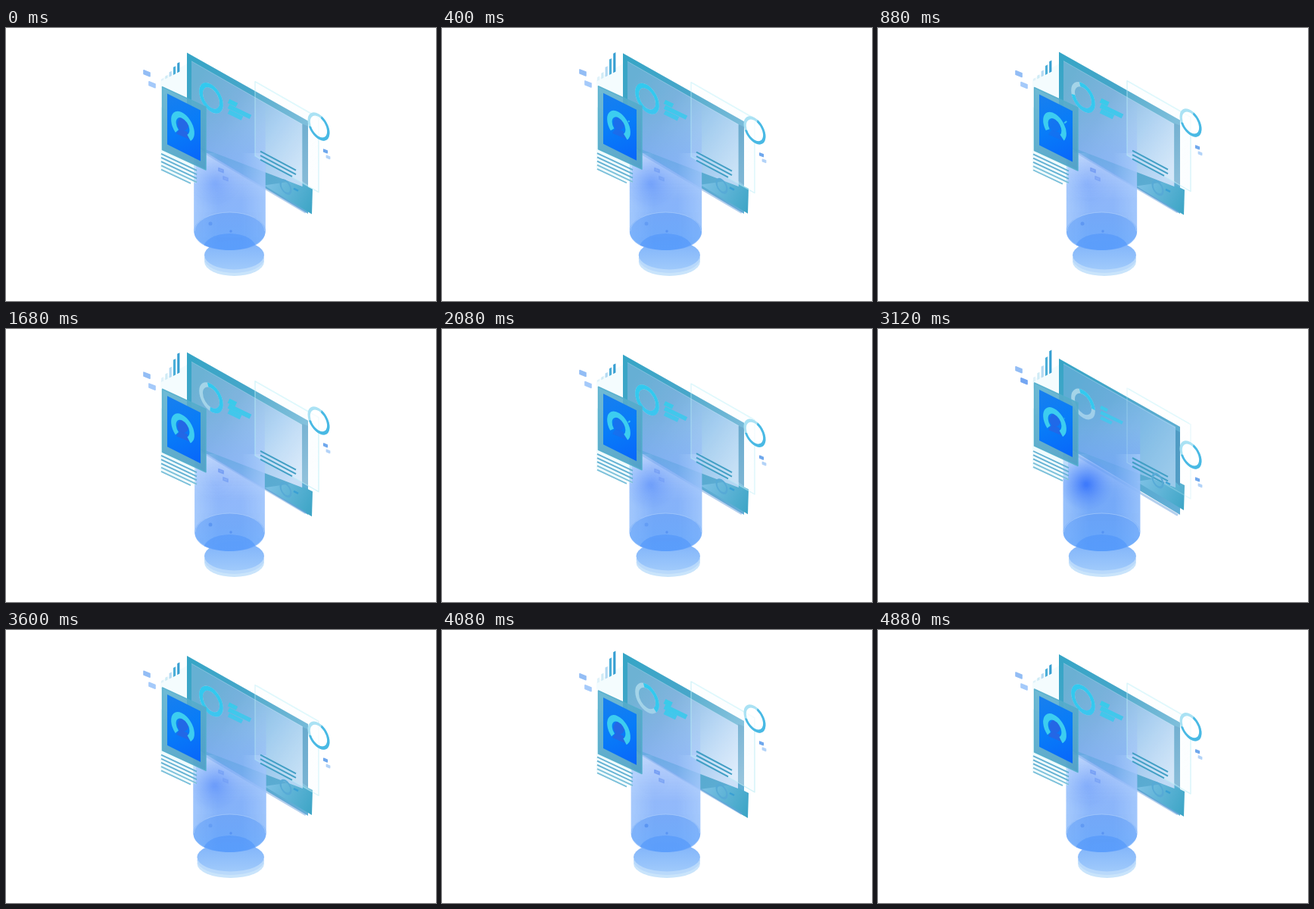
Animation of 568x360 px, one loop 4.96 s. Source, as an HTML page with a canvas:

```html
<!DOCTYPE html>
<html lang="en">
<head>
<meta charset="utf-8">
<title>Floating screens</title>
<style>
html, body { margin: 0; width: 100%; height: 100%; overflow: hidden; background: #fff; }
canvas { display: block; width: 568px; height: 360px; }
</style>
</head>
<body>
<canvas id="stage" width="568" height="360"></canvas>
<script>
const ctx = document.getElementById('stage').getContext('2d');
const LOOP = 4960, CHART = LOOP / 2, STEP = 80, TAU = Math.PI * 2;

// [time, value] keys: a small rise, then the main one
const FLOAT = [[0, 0.265], [320, 0.38], [880, 0.163], [1340, 0.03], [1680, 0.08],
  [2480, 0.775], [2860, 1.03], [3120, 1], [4080, 0], [4880, 0.22]];
const BARS = [[0, 0.42], [540, 1], [650, 1], [880, 0.5], [1180, 0.5], [1500, 1],
  [1600, 1], [2000, 0.4]];
const FACE = [[0, 1], [880, 0.35], [1680, 1], [2480, 0], [3120, 0.9], [4080, 1]];
const BASE_LEFT = [[0, 262], [880, 257], [1680, 262], [2480, 251], [4080, 253], [4880, 264]];

const clamp = v => Math.min(1, Math.max(0, v));

// Periodic curve through the keys, smooth or straight
function track(keys, t, period = LOOP, smooth = false) {
  const n = keys.length;
  const key = i => {
    const [time, value] = keys[(i + n) % n];
    return [time + period * Math.floor(i / n), value];
  };
  let i = n - 1;
  while (keys[i][0] > t) i--;
  const [t0, a] = key(i), [t1, b] = key(i + 1);
  const u = (t - t0) / (t1 - t0);
  if (!smooth) return a + (b - a) * u;
  const slope = j => {
    const [p, v] = key(j - 1), [q, w] = key(j + 1);
    return (w - v) / (q - p) * (t1 - t0);
  };
  const u2 = u * u, u3 = u2 * u;
  return a * (2 * u3 - 3 * u2 + 1) + slope(i) * (u3 - 2 * u2 + u)
       + b * (3 * u2 - 2 * u3) + slope(i + 1) * (u3 - u2);
}

// The donut refills twice per chart cycle
function donutFill(t) {
  const c = t % CHART;
  if (c < 490) return 1;
  return clamp((c - (c < 1390 ? 490 : 1390)) / 510);
}

function gradient(x0, y0, x1, y1, ...colors) {
  const g = ctx.createLinearGradient(x0, y0, x1, y1);
  colors.forEach((c, i) => g.addColorStop(i / (colors.length - 1), c));
  return g;
}

function poly(points, fill, stroke, width = 1) {
  ctx.beginPath();
  points.forEach(([x, y]) => ctx.lineTo(x, y));
  ctx.closePath();
  ctx.lineJoin = 'round';
  if (fill) { ctx.fillStyle = fill; ctx.fill(); }
  if (stroke) { ctx.strokeStyle = stroke; ctx.lineWidth = width; ctx.stroke(); }
}

const slant = (x, y, w, h, k = 0.56) =>
  [[x, y], [x + w, y + w * k], [x + w, y + w * k + h], [x, y + h]];

function line(x, y, w, k, color, width) {
  ctx.strokeStyle = color;
  ctx.lineWidth = width;
  ctx.beginPath();
  ctx.moveTo(x, y);
  ctx.lineTo(x + w, y + w * k);
  ctx.stroke();
}

function isoArc(x, y, r, width, color, from = 0, to = TAU) {
  ctx.save();
  ctx.transform(0.866, 0.5, 0, 1, x, y);
  ctx.beginPath();
  ctx.arc(0, 0, r, from, to);
  ctx.strokeStyle = color;
  ctx.lineWidth = width;
  ctx.stroke();
  ctx.restore();
}

function ellipse(x, y, rx, ry, fill) {
  ctx.beginPath();
  ctx.ellipse(x, y, rx, ry, 0, 0, TAU);
  ctx.fillStyle = fill;
  ctx.fill();
}

function tile(x, y, s, color) {
  poly(slant(x - s, y - s * 0.8, s * 2, s * 1.2, 0.4), color, color, 1.6);
}

function drawBars(t) {
  const g = track(BARS, t % CHART, CHART);
  const colors = ['#e0f2fa', '#cfebf6', '#b2d9f2', '#4baed8', '#379fd2'];
  poly([[204, 68], [239, 47], [239, 92], [204, 78]], 'rgba(205,240,248,0.22)');
  [6, 9, 15, 24, 30].forEach((h, i) => {
    const x = 205 + i * 5.3, y = 70 - i * 2.7;
    poly([[x, y], [x + 3.2, y - 1.6], [x + 3.2, y - 1.6 - h * g], [x, y - h * g]], colors[i]);
  });
}

function drawScreen(t, k, lift) {
  const top = 30 + 9 * k, low = 248 - 9 * k, strip = 399 - 8 + 2 * lift;
  poly([[239, top], [399, top + 90], [399, 245], [262, 163], [239, 148]],
    gradient(239, 40, 400, 230, '#36a5c6', '#4fa7cb', '#62aed6'));
  poly([[383, low - 44], [405, low - 33], [404, low], [341, low - 38]],
    gradient(345, 210, 404, 240, '#79bfe3', '#3da5c6'));

  const inset = 13 - 6 * lift;
  const inner = [[245, top + inset], [strip, top + inset + 83], [strip, 209], [258, 158], [245, 148]];
  poly(inner, gradient(245, 80, 395, 175, '#6db2d3', '#82b4de', '#a3caf0', '#cbe0f8'));
  poly(inner, `rgba(72,163,212,${0.42 * lift})`);
  line(245, top + inset, strip - 245, 0.57, 'rgba(180,222,242,0.4)', 1);
  line(258, 161 + 3 * k, 138, 0.59, 'rgba(105,160,220,0.5)', 3);
  poly([[strip, top + 94], [399, top + 97], [399, 207], [strip, 202]], '#4796c1');

  const y = 90 + 9 * k;
  const fill = donutFill(t);
  isoArc(271, y, 15.5, 5.5, '#a4d4e8');
  if (fill > 0) isoArc(271, y, 15.5, 5.5, '#32c9ef', -1.9, -1.9 + TAU * fill);

  const full = 0.75 + 0.25 * fill;
  const thick = 6.5 - 2.3 * lift;
  [11, 29, 18].forEach((w, i) =>
    line(294, y + 4 + i * 7, w * (i === 1 ? 1 : full), 0.48, '#38cbea', thick));
}

function drawSheet(k, lift) {
  const y = 68 + 10 * k, veil = 1 - 0.85 * lift;
  poly(slant(329, y, 84, 98, 0.57),
    gradient(329, 100, 413, 180, `rgba(238,249,255,${0.14 * veil})`, `rgba(246,252,255,${0.45 * veil})`),
    `rgba(184,236,246,${0.25 + 0.35 * veil})`, 1.4);
  line(331, y + 1, 80, 0.57, 'rgba(225,250,253,0.85)', 1.5);
  [47, 47, 42].forEach((w, i) =>
    line(336, 160 + 10 * k + i * 5.5, w, 0.53, '#429fc5', 2));
  const low = 213 - 13 * k;
  isoArc(369.5, low, 8, 2.6, '#57aad6');
  line(380, low + 2, 6, 0.5, '#3aa0d4', 2.5);
}

function drawBase(t) {
  const left = track(BASE_LEFT, t);
  const disc = (y, fill) => ellipse((left + 341) / 2, y, (341 - left) / 2, 19, fill);
  disc(308, '#c9e4fb');
  disc(304, '#b9d9fb');
  disc(299.5, gradient(0, 281, 0, 319, '#7fb3fa', '#a0cafb'));
}

function bodyPath(left, right) {
  const mid = (left + right) / 2;
  ctx.beginPath();
  ctx.moveTo(left, 95);
  ctx.lineTo(left, 267);
  ctx.bezierCurveTo(left, 284, mid - 27, 293, mid, 293);
  ctx.bezierCurveTo(mid + 27, 293, right, 284, right, 267);
  ctx.lineTo(right, 95);
  ctx.closePath();
}

function drawColumn(t, k, lift) {
  drawBase(t);
  const left = 249.5 - 5 * k, right = 341.5 + 5 * k, mid = (left + right) / 2;
  ctx.save();
  bodyPath(left, right);
  ctx.clip();
  ctx.fillStyle = gradient(0, 95, 0, 292, 'rgba(130,174,246,0)', 'rgba(134,175,248,0.5)',
    'rgba(142,182,250,0.96)', 'rgba(133,182,251,0.97)');
  ctx.fillRect(left, 95, right - left, 200);
  ctx.fillStyle = gradient(0, 130, 0, 292, 'rgba(75,145,243,0)',
    `rgba(75,145,243,${0.42 * lift})`, `rgba(75,150,248,${0.36 * lift})`);
  ctx.fillRect(left, 130, right - left, 165);
  ctx.fillStyle = gradient(left, 0, right, 0, 'rgba(190,220,255,0.5)',
    'rgba(190,220,255,0)', 'rgba(190,220,255,0)', 'rgba(190,220,255,0.45)');
  ctx.fillRect(left, 165, right - left, 130);
  ellipse(mid, 268, (right - left) / 2, 25,
    gradient(0, 243, 0, 293, 'rgba(94,155,246,0.5)', 'rgba(93,163,252,0.55)'));
  ellipse(mid, 291, 35, 20, 'rgba(70,143,250,0.45)');

  const glow = clamp(0.03 + 0.82 * k);
  const shine = ctx.createRadialGradient(275, 205, 2, 275, 205, 36);
  shine.addColorStop(0, `rgba(51,113,252,${glow})`);
  shine.addColorStop(0.45, `rgba(70,127,252,${glow * 0.55})`);
  shine.addColorStop(1, 'rgba(90,145,252,0)');
  ctx.fillStyle = shine;
  ctx.fillRect(235, 165, 80, 80);
  ctx.restore();

  ctx.strokeStyle = 'rgba(186,215,252,0.5)';
  ctx.lineWidth = 1;
  ctx.beginPath();
  ctx.ellipse(mid, 268, (right - left) / 2 - 1, 25, 0, Math.PI, TAU);
  ctx.stroke();

  const fade = 0.5 * (1 - lift);
  tile(284, 187, 3.2, `rgba(91,137,239,${fade})`);
  tile(290, 198, 3.2, `rgba(91,137,239,${fade * 0.7})`);
  ellipse(270, 258, 2.5, 2.5, `rgba(62,125,234,${fade})`);
  ellipse(297, 268, 1.7, 1.7, 'rgba(62,125,234,0.45)');
}

function drawCard(t, k) {
  const y = 80 - 9 * k;
  poly([[204, 104], [251, 126], [251, 207 - 8 * k], [204, 188 - 4 * k]],
    'rgba(218,244,251,0.4)');
  [47, 47, 47, 47, 39].forEach((w, i) =>
    line(205, 167.5 - 6.5 * k + i * 5.2, w, 0.47, i < 3 ? '#63b1d3' : '#7bc0da', 1.9));
  poly(slant(206.5, y, 57.5, 83, 0.46),
    gradient(206, y, 264, y + 110, 'rgba(91,177,207,0.88)', 'rgba(74,157,195,0.9)'),
    'rgba(83,174,204,0.9)', 1.5);
  poly(slant(213, y + 9, 44, 67, 0.5),
    gradient(213, y + 10, 250, y + 98, '#187fee', '#087cf8', '#0867fa'));

  const cy = y + 52;
  const face = track(FACE, t), turn = 0.3 * (1 - face);
  ctx.save();
  ctx.globalAlpha = face;
  ellipse(234, cy - 3, 7.5, 9, '#2467e5');
  poly([[229, cy + 4], [239, cy + 7], [244, cy + 18], [225, cy + 10]], '#2467e5');
  ctx.restore();
  isoArc(233.5, cy, 14, 7.5, '#3ccdf0', 2.25 + turn, TAU + 0.85 - turn);
  if (face < 0.95) line(246, cy - 5, 5 * (1 - face), -0.8, '#39c5ed', 2);
}

function drawSatellites(k) {
  const y = 117 + 49 * k;
  ctx.save();
  ctx.transform(0.866, 0.5, 0, 1, 413, y);
  ellipse(0, 0, 14, 14, 'rgba(255,255,255,0.7)');
  ctx.restore();
  isoArc(413, y, 14.8, 3.8, '#aae2f4');
  isoArc(413, y, 14.8, 3.8, '#49b9e4', -1.3, 2.7);

  tile(422, y + 32, 2.3, '#70a8ed');
  tile(425.5, y + 40, 2.1, '#b3d3f8');
  tile(186, 61 - 8 * k, 4, '#93bdf5');
  tile(193, 76 - 8 * k, 4, k > 0.5 ? '#74a6f2' : '#a5cafa');
}

function draw(t) {
  const k = track(FLOAT, t, LOOP, true), lift = clamp(k);
  ctx.clearRect(0, 0, 568, 360);
  drawBars(t);
  drawScreen(t, k, lift);
  drawColumn(t, k, lift);
  drawSheet(k, lift);
  drawCard(t, k);
  drawSatellites(k);
}

const start = performance.now();
function frame() {
  const t = (performance.now() - start) % LOOP;
  draw(Math.floor(t / STEP) * STEP);
  requestAnimationFrame(frame);
}
frame();
</script>
</body>
</html>
```
